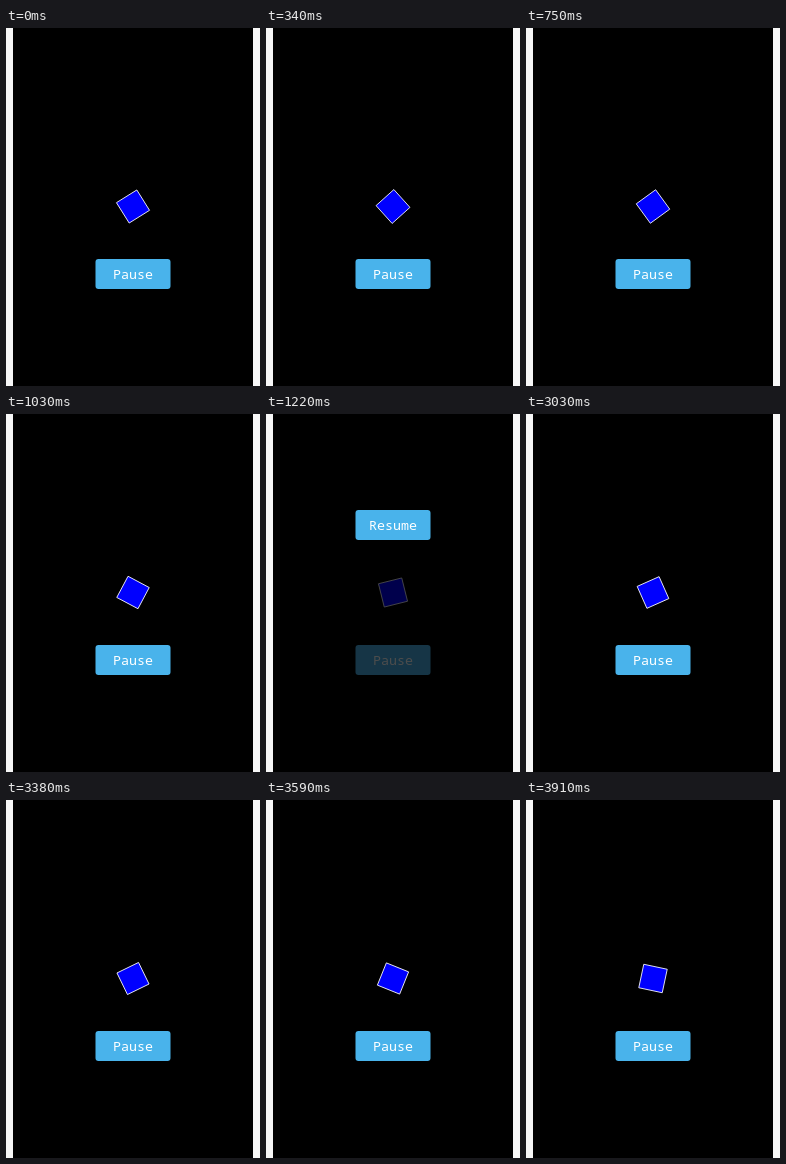
Write an HTML page that moves like this. It is 254x358 px and loops after 3940 ms.

```html
<!DOCTYPE html>
<html lang="en">
<head>
<meta charset="utf-8">
<title>Pause and resume</title>
<style>
  html, body { margin: 0; width: 100%; height: 100%; overflow: hidden; background: #f7f7f7; }
  svg { display: block; width: 100vw; height: 100vh; }
  text { font: 13.33px "Noto Sans Mono", monospace; fill: #fff; text-anchor: middle; }
  .button { fill: #49b3eb; }
</style>
</head>
<body>
<svg viewBox="0 0 254 358">
  <rect width="254" height="358" fill="#f7f7f7"/>
  <rect x="7" width="240" height="358"/>
  <rect id="box" x="-12" y="-12" width="24" height="24" fill="#00f" stroke="#fff" stroke-width=".8"/>
  <rect class="button" x="89.5" y="231" width="75" height="30" rx="3"/>
  <text x="127" y="251">Pause</text>
  <g id="menu">
    <rect x="7" width="240" height="358" opacity=".7"/>
    <rect class="button" x="89.5" y="96" width="75" height="30" rx="3"/>
    <text x="127" y="116">Resume</text>
  </g>
</svg>
<script>
const LOOP = 3940, PAUSE = 1220, RESUME = 2690;
const START = 58, STEP = 8, STEPS_TO_PAUSE = 36;
const box = document.getElementById('box');
const menu = document.getElementById('menu');

// The square turns in fixed ticks and holds its angle while paused.
function stepsAt(t) {
  if (t < PAUSE) return Math.floor(t / 33.8);
  if (t < RESUME) return STEPS_TO_PAUSE;
  return STEPS_TO_PAUSE + Math.floor((t - RESUME) / 32.85);
}

function draw(t) {
  const angle = START + STEP * stepsAt(t);
  box.setAttribute('transform', `translate(127 178.5) rotate(${angle % 360})`);
  menu.style.display = t >= PAUSE && t < RESUME ? '' : 'none';
}

const begin = performance.now();
function tick() {
  draw((performance.now() - begin) % LOOP);
  requestAnimationFrame(tick);
}
tick();
</script>
</body>
</html>
```
